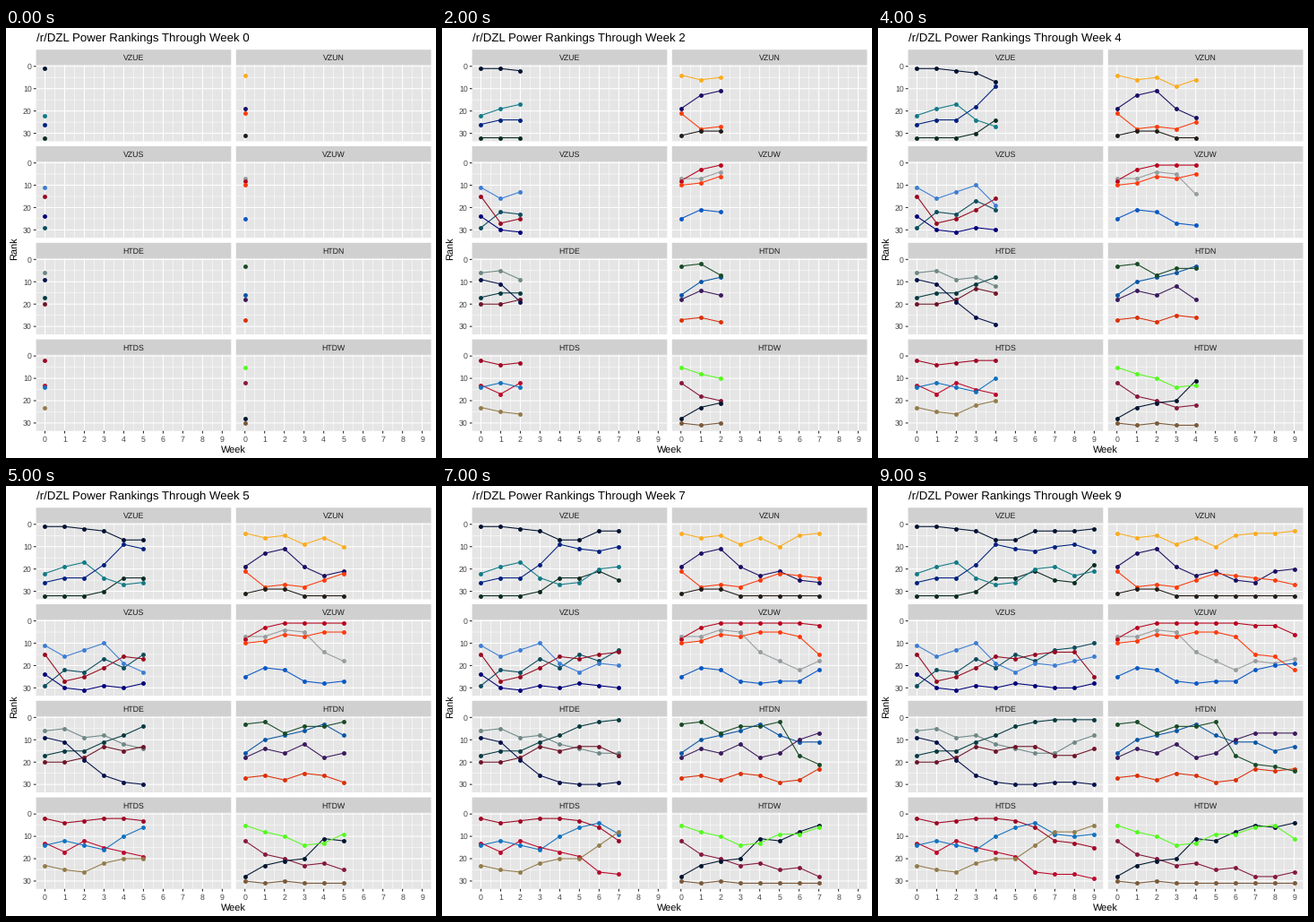
Recreate the animation shown at these times as a matplotlib script. Size 480x480 px, loop 10 s.

```python
import matplotlib.pyplot as plt
from matplotlib.animation import FuncAnimation
from matplotlib.patches import Rectangle

plt.rcParams["font.family"] = "Liberation Sans"
plt.rcParams["path.snap"] = False
plt.rcParams["text.hinting"] = "none"

SIZE = 480
WEEKS = 10
LEFT, TOP = 33.6, 24.2
PANEL_W, PANEL_H = 217.7, 85.0
STRIP_H, GAP_X, PITCH_Y = 17.2, 5.5, 107.8
DX, DY = PANEL_W / 9.9, PANEL_H / 34.1

# At 72 dpi one point is one pixel, so all sizes are in pixels.
fig = plt.figure(figsize=(SIZE / 72, SIZE / 72), dpi=72, facecolor="white")
ax = fig.add_axes([0, 0, 1, 1])
ax.set_xlim(0, SIZE)
ax.set_ylim(SIZE, 0)
ax.axis("off")

series = []


def rect(x, y, w, h, color):
    ax.add_patch(Rectangle((x, y), w, h, fc=color, lw=0, zorder=0))


def rule(xs, ys, width, color="white", z=1):
    ax.plot(xs, ys, color=color, lw=width, solid_capstyle="butt", zorder=z)


def label(x, y, text, size, color="black", ha="center", **kw):
    return ax.text(x, y, text, fontsize=size, color=color, ha=ha,
                   va="baseline", **kw)


def panel(col, row, name, *teams):
    left = LEFT + col * (PANEL_W + GAP_X)
    strip = TOP + row * PITCH_Y
    top = strip + STRIP_H
    right, bottom = left + PANEL_W, top + PANEL_H

    def px(week):
        return left + (week + 0.45) * DX

    def py(rank):
        return top + (rank + 0.55) * DY

    rect(left, strip, PANEL_W, STRIP_H, "#d0d0d0")
    rect(left, top, PANEL_W, PANEL_H, "#e5e5e5")
    label((left + right) / 2, strip + 12, name, 8.8, "#1a1a1a")

    for rank in range(0, 31, 5):
        major = rank % 10 == 0
        y = py(rank)
        rule([left, right], [y, y], 1.07 if major else 0.53)
        if major and col == 0:
            rule([left - 2.75, left], [y, y], 1.07, "#2b2b2b")
            label(left - 4.9, y + 3.2, str(rank), 8.8, "#444444", "right")

    for half in range(2 * WEEKS - 1):
        major = half % 2 == 0
        x = px(half / 2)
        rule([x, x], [top, bottom], 1.07 if major else 0.53)
        if major and row == 3:
            rule([x, x], [bottom, bottom + 2.75], 1.07, "#2b2b2b")
            label(x, bottom + 12.2, str(half // 2), 8.8, "#444444")

    for color, ranks in teams:
        line, = ax.plot([], [], color=color, lw=1.07, zorder=3)
        dots, = ax.plot([], [], "o", color=color, ms=4.9, mew=0, zorder=4)
        xs = [px(w) for w in range(WEEKS)]
        series.append((line, dots, xs, [py(r) for r in ranks]))


panel(0, 0, "VZUE",
      ("#0a2a22", [32, 32, 32, 30, 24, 24, 21, 25, 26, 18]),
      ("#117a86", [22, 19, 17, 24, 27, 26, 20, 19, 23, 21]),
      ("#00207f", [26, 24, 24, 18, 9, 11, 12, 10, 9, 12]),
      ("#001130", [1, 1, 2, 3, 7, 7, 3, 3, 3, 2]))
panel(1, 0, "VZUN",
      ("#180e64", [19, 13, 11, 19, 23, 21, 25, 26, 21, 20]),
      ("#fa3c0c", [21, 28, 27, 28, 25, 22, 23, 24, 25, 27]),
      ("#211c18", [31, 29, 29, 32, 32, 32, 32, 32, 32, 32]),
      ("#fbac1c", [4, 6, 5, 9, 6, 10, 5, 4, 4, 3]))
panel(0, 1, "VZUS",
      ("#0c4c5e", [29, 22, 23, 17, 21, 15, 18, 13, 12, 10]),
      ("#980a20", [15, 27, 25, 21, 16, 17, 15, 14, 14, 25]),
      ("#00007a", [24, 30, 31, 29, 30, 28, 29, 30, 30, 28]),
      ("#3c7ed4", [11, 16, 13, 10, 19, 23, 19, 20, 18, 16]))
panel(1, 1, "VZUW",
      ("#979d9f", [7, 7, 4, 5, 14, 18, 22, 18, 19, 17]),
      ("#b8051f", [8, 3, 1, 1, 1, 1, 1, 2, 2, 6]),
      ("#fb3a0c", [10, 9, 6, 7, 5, 5, 7, 15, 16, 22]),
      ("#0a58c4", [25, 21, 22, 27, 28, 27, 27, 22, 20, 19]))
panel(0, 2, "HTDE",
      ("#6f8886", [6, 5, 9, 8, 12, 14, 16, 16, 11, 8]),
      ("#6f1428", [20, 20, 18, 13, 15, 13, 13, 17, 17, 14]),
      ("#053a40", [17, 15, 15, 11, 8, 4, 2, 1, 1, 1]),
      ("#04114a", [9, 11, 19, 26, 29, 30, 30, 29, 29, 30]))
panel(1, 2, "HTDN",
      ("#dc3008", [27, 26, 28, 25, 26, 29, 28, 23, 24, 23]),
      ("#0a56a6", [16, 10, 8, 6, 3, 8, 11, 11, 15, 13]),
      ("#174a26", [3, 2, 7, 4, 4, 2, 17, 21, 22, 24]),
      ("#3b1a5c", [18, 14, 16, 12, 18, 16, 10, 7, 7, 7]))
panel(0, 3, "HTDS",
      ("#9f0824", [2, 4, 3, 2, 2, 3, 6, 12, 13, 15]),
      ("#bb0a2c", [13, 17, 12, 15, 17, 19, 26, 27, 27, 29]),
      ("#1272c0", [14, 12, 14, 16, 10, 6, 4, 9, 10, 9]),
      ("#937c4a", [23, 25, 26, 22, 20, 20, 14, 8, 8, 5]))
panel(1, 3, "HTDW",
      ("#85183a", [12, 18, 20, 23, 22, 25, 24, 28, 28, 26]),
      ("#00152f", [28, 23, 21, 20, 11, 12, 8, 5, 6, 4]),
      ("#7a5a3a", [30, 31, 30, 31, 31, 31, 31, 31, 31, 31]),
      ("#54fa1e", [5, 8, 10, 14, 13, 9, 9, 6, 5, 11]))

title = label(LEFT, 15, "", 13.2, ha="left")
label(254, 475, "Week", 11)
label(13.4, 246, "Rank", 11, rotation=90, rotation_mode="anchor")


def draw(week):
    title.set_text(f"/r/DZL Power Rankings Through Week {week}")
    for line, dots, xs, ys in series:
        line.set_data(xs[:week + 1], ys[:week + 1])
        dots.set_data(xs[:week + 1], ys[:week + 1])
    return [title]


anim = FuncAnimation(fig, draw, frames=WEEKS, interval=1000,
                     init_func=lambda: draw(0), repeat=True)
plt.show()
```
